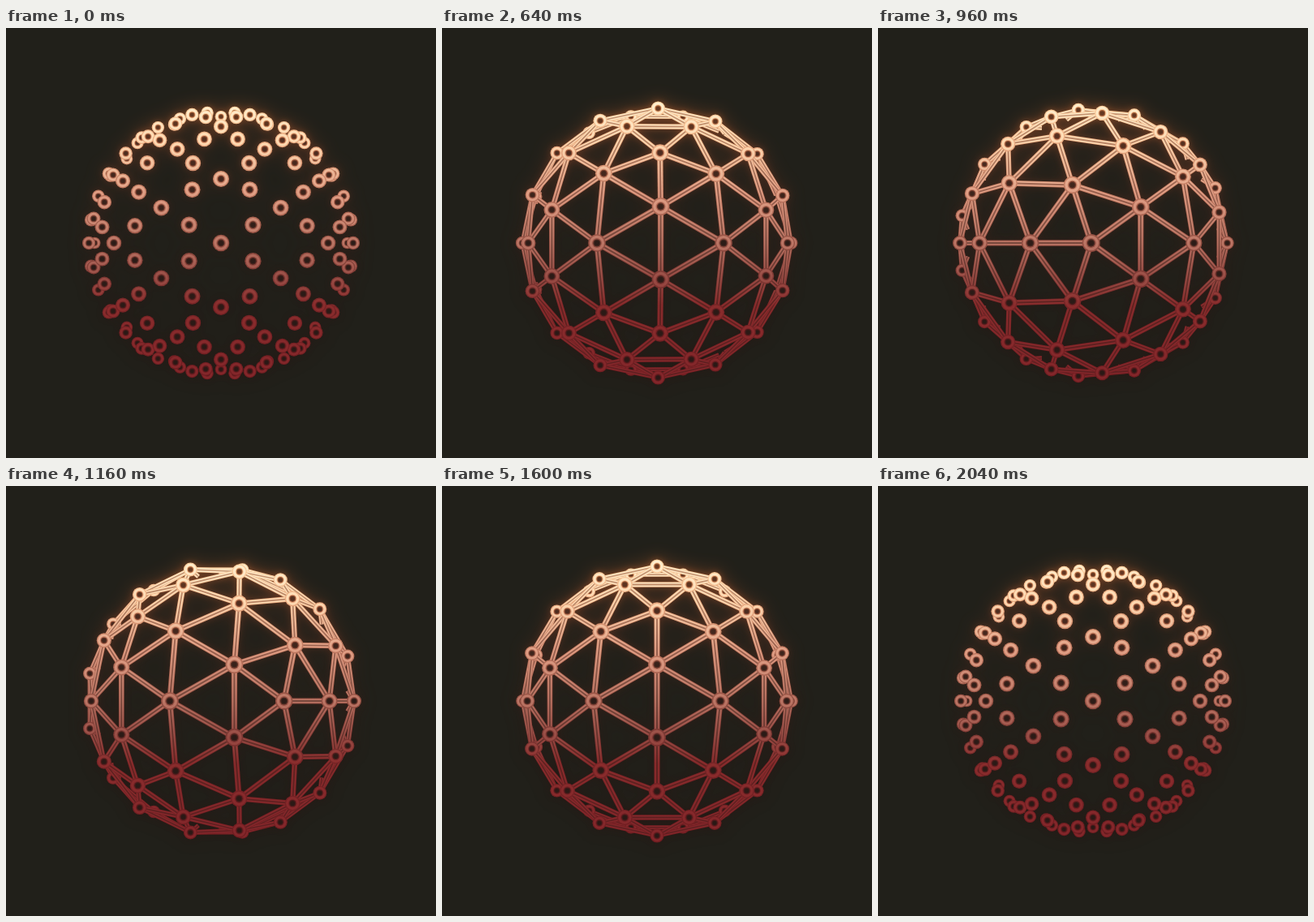
An HTML page with a canvas that plays this animation: 530x530 px, repeating every 2120 ms.

```html
<!DOCTYPE html>
<html lang="en">
<head>
<meta charset="utf-8">
<title>Geodesic sphere</title>
<style>
html, body { margin: 0; width: 100%; height: 100%; overflow: hidden; background: #21201a; }
canvas { display: block; width: 530px; height: 530px; }
</style>
</head>
<body>
<canvas id="c" width="530" height="530"></canvas>
<script>
const SIZE = 530, MID = 265, LOOP = 2120, STEP = 40;
const FOCAL = 544, CAM = 3.42, CUT = -0.01;
const DOT = 0.046, NODE = 0.049, BAR = 0.033;
const TAU = Math.PI * 2;

const ctx = document.getElementById('c').getContext('2d');
function layer() {
  const c = document.createElement('canvas');
  c.width = c.height = SIZE;
  return c.getContext('2d');
}
const art = layer(), glow = layer();

// Icosahedron with every face split into nine
const dist = (a, b) => Math.hypot(a[0] - b[0], a[1] - b[1], a[2] - b[2]);
const mix = (a, b, k) => a.map((v, i) => v + (b[i] - v) * k);
const unit = v => { const n = Math.hypot(...v); return v.map(x => x / n); };

function buildPoints() {
  const phi = (1 + Math.sqrt(5)) / 2, base = [];
  for (const s of [-1, 1]) for (const q of [-phi, phi]) {
    base.push([0, s, q], [q, 0, s], [s, q, 0]);
  }
  const ico = base.map(unit), out = [...ico];
  const near = (i, j) => dist(ico[i], ico[j]) < 1.1;
  for (let i = 0; i < 12; i++) for (let j = i + 1; j < 12; j++) {
    if (!near(i, j)) continue;
    out.push(unit(mix(ico[i], ico[j], 1 / 3)), unit(mix(ico[i], ico[j], 2 / 3)));
    for (let k = j + 1; k < 12; k++) {
      if (near(i, k) && near(j, k)) out.push(unit(ico[i].map((v, n) => v + ico[j][n] + ico[k][n])));
    }
  }
  return out;
}
const points = buildPoints(), edges = [];
points.forEach((a, i) => {
  for (let j = i + 1; j < points.length; j++) if (dist(a, points[j]) < 0.45) edges.push([i, j]);
});

// Colour depends on height on the stage
function ramp(stops) {
  const g = art.createLinearGradient(0, 90, 0, 440);
  stops.forEach(([k, c]) => g.addColorStop(k, c));
  return g;
}
const body = ramp([[0, '#ffd6a4'], [0.15, '#eaaa80'], [0.32, '#bf7860'], [0.5, '#955043'],
  [0.62, '#7d3833'], [0.72, '#762426'], [1, '#701c20']]);
const light = ramp([[0, '#fff1d2'], [0.15, '#ffdab2'], [0.32, '#e2a086'], [0.5, '#bc7665'],
  [0.62, '#9a4e46'], [0.72, '#8a2c2c'], [1, '#82262a']]);
const core = ramp([[0, '#a86238'], [0.15, '#8a4a30'], [0.32, '#6a3629'], [0.5, '#4a2820'],
  [0.72, '#431a18'], [1, '#4a191a']]);
const hole = ramp([[0, '#6b3c22'], [0.2, '#4a2a1e'], [0.5, '#2c1c17'], [1, '#2a1815']]);

const clamp = x => Math.min(1, Math.max(0, x));
const quad = p => p < 0.5 ? 2 * p * p : 1 - 2 * (1 - p) ** 2;
const cubic = p => p < 0.5 ? 4 * p ** 3 : 1 - 4 * (1 - p) ** 3;
const scaleAt = z => FOCAL / (CAM - z);

function project([x, y, z]) {
  const s = scaleAt(z);
  return [MID + x * s, MID - y * s];
}

function disc(x, y, r, style) {
  art.fillStyle = style;
  art.beginPath();
  art.arc(x, y, r, 0, TAU);
  art.fill();
}

function ring(p, size) {
  const [x, y] = project(p), r = size * scaleAt(p[2]);
  if (r < 0.5) return;
  disc(x, y, r, body);
  disc(x, y, r * 0.85, light);
  disc(x, y, r * 0.55, body);
  disc(x, y, r * 0.43, core);
  disc(x, y, r * 0.3, hole);
}

function line(a, b, width, style) {
  art.strokeStyle = style;
  art.lineWidth = width;
  art.beginPath();
  art.moveTo(...a);
  art.lineTo(...b);
  art.stroke();
}

function bar(a, b) {
  if (a[2] < b[2]) [a, b] = [b, a];
  if (a[2] <= CUT) return;
  if (b[2] < CUT) b = mix(a, b, (a[2] - CUT) / (a[2] - b[2]));
  const w = BAR * scaleAt((a[2] + b[2]) / 2), p = project(a), q = project(b);
  line(p, q, w, body);
  line(p, q, w * 0.74, light);
  art.globalAlpha = 0.6;
  line(p, q, w * 0.28, core);
  art.globalAlpha = 1;
}

function drawSphere(t) {
  const grow = quad(clamp((t - 100) / 430)) - quad(clamp((t - 1587) / 430));
  const turn = Math.PI * cubic(clamp((t - 519) / 1023));
  const dot = DOT * clamp(1 - 1.5 * grow), node = NODE * clamp((grow - 0.6) / 0.4);
  const c = Math.cos(turn), s = Math.sin(turn);
  const pts = points.map(([x, y, z]) => [x * c + z * s, y, z * c - x * s]);
  const items = [];
  for (const [i, j] of edges) {
    const a = pts[i], b = pts[j], m = mix(a, b, 0.5);
    if (grow > 0.01) items.push([m[2], () => bar(mix(m, a, grow), mix(m, b, grow))]);
    if (dot > 0 && m[2] > CUT) items.push([m[2] + 0.01, () => ring(m, dot)]);
  }
  if (node > 0) for (const p of pts) {
    if (p[2] > CUT) items.push([p[2] + 0.22, () => ring(p, node)]);
  }
  items.sort((a, b) => a[0] - b[0]);
  art.clearRect(0, 0, SIZE, SIZE);
  items.forEach(item => item[1]());
}

const halo = glow.createLinearGradient(0, 80, 0, 340);
halo.addColorStop(0, 'rgba(215,110,50,.8)');
halo.addColorStop(0.3, 'rgba(165,75,42,.55)');
halo.addColorStop(0.6, 'rgba(90,36,26,.4)');
halo.addColorStop(1, 'rgba(46,14,12,.4)');

function drawGlow(radius, alpha) {
  glow.clearRect(0, 0, SIZE, SIZE);
  glow.filter = `blur(${radius}px)`;
  glow.drawImage(art.canvas, 0, 0);
  glow.filter = 'none';
  glow.globalCompositeOperation = 'source-in';
  glow.fillStyle = halo;
  glow.fillRect(0, 0, SIZE, SIZE);
  glow.globalCompositeOperation = 'source-over';
  ctx.globalAlpha = alpha;
  ctx.drawImage(glow.canvas, 0, 0);
  ctx.globalAlpha = 1;
}

function render(t) {
  drawSphere(t);
  ctx.fillStyle = '#21201a';
  ctx.fillRect(0, 0, SIZE, SIZE);
  drawGlow(11, 0.6);
  drawGlow(4, 0.6);
  ctx.filter = 'blur(0.6px)';
  ctx.drawImage(art.canvas, 0, 0);
  ctx.filter = 'none';
}

let start = null, shown = -1;
function tick(now) {
  if (start === null) start = now;
  const t = Math.floor(((now - start) % LOOP) / STEP) * STEP;
  if (t !== shown) render(shown = t);
  requestAnimationFrame(tick);
}
render(0);
requestAnimationFrame(tick);
</script>
</body>
</html>
```
